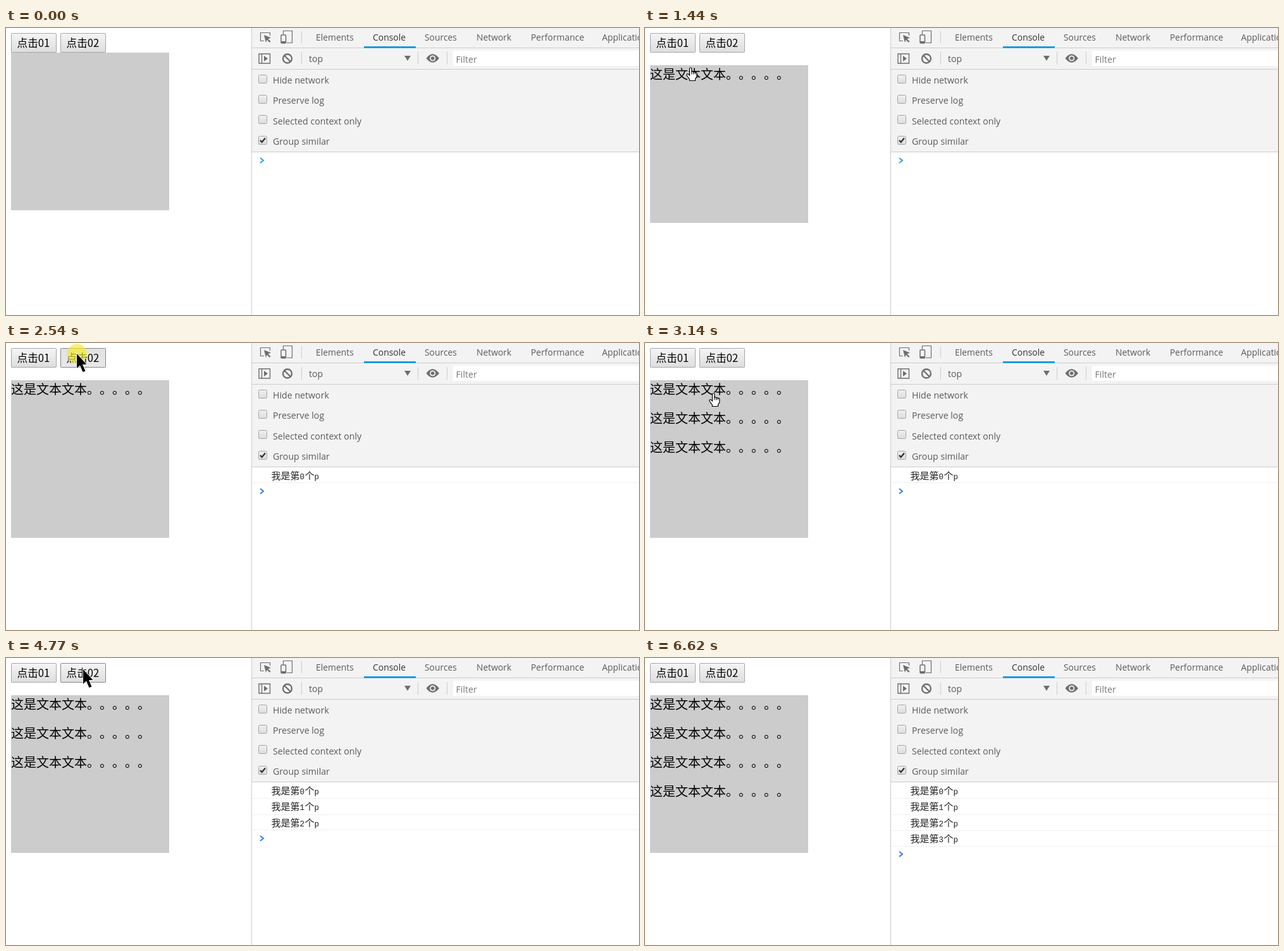
An HTML page with a canvas for the animation above (7080 ms loop, 1001 px wide and 455 px high).

```html
<!DOCTYPE html>
<html lang="zh-CN">
<head>
<meta charset="utf-8">
<title>Click demo</title>
<style>
html, body { margin: 0; width: 100%; height: 100%; overflow: hidden; background: #fff; }
canvas { display: block; }
</style>
</head>
<body>
<canvas id="stage" width="1001" height="455"></canvas>
<script>
const c = document.getElementById('stage').getContext('2d');
const LOOP = 7080, STEP = 76;
const CJK = '"Noto Sans CJK SC", "Noto Sans CJK", sans-serif';
const UI = '"Open Sans", "Noto Sans", sans-serif';
const MONO = '"Liberation Mono", "DejaVu Sans Mono", monospace';
const INK = '#6e6e6e', RULE = '#ccc', PANEL = '#f3f3f3', GLOW = 'rgba(242,236,40,.68)';

// The cursor glides to each stop in turn, moving once per STEP
const entry = { x: 970, y: 518 };
const stops = [
  { from: 140, steps: 10, x: 50, y: 24 },
  { from: 1290, steps: 5, x: 76, y: 70 },
  { from: 2220, steps: 5, x: 112, y: 17 },
  { from: 3070, steps: 5, x: 105, y: 116 },
  { from: 3690, steps: 2, x: 106, y: 141 },
  { from: 3840, steps: 2, x: 99, y: 156 },
  { from: 4370, steps: 6, x: 122, y: 18 },
  { from: 5230, steps: 6, x: 114, y: 225 },
  { from: 5686, steps: 2, x: 110, y: 215 },
  { from: 6240, steps: 5, x: 900, y: 430 }
];
const GONE = 6620;

// Each click takes effect when the button is let go
const click = (adds, up, hold = 80) => ({ adds, up, down: up - hold });
const clicks = [
  click('line', 980), click('log', 1840, 170),
  click('line', 2600), click('line', 2760), click('log', 3540),
  click('log', 4140, 150), click('line', 4920), click('log', 5840)
];
const count = (kind, t) => clicks.filter(k => k.adds === kind && t >= k.up).length;
const easeOut = u => 1 - (1 - u) ** 2;

function cursorAt(t) {
  if (t < stops[0].from || t >= GONE) return null;
  const i = stops.filter(s => t >= s.from).length - 1;
  const a = stops[i - 1] || entry, b = stops[i];
  const k = Math.floor((t - b.from + 12) / STEP) + 1;
  const u = easeOut(Math.min(1, k / b.steps));
  return { x: Math.round(a.x + (b.x - a.x) * u), y: Math.round(a.y + (b.y - a.y) * u) };
}

function box(x, y, w, h, color) {
  c.fillStyle = color;
  c.fillRect(x, y, w, h);
}

function shade(x, y, w, h, top, bottom) {
  const g = c.createLinearGradient(0, y, 0, y + h);
  g.addColorStop(0, top);
  g.addColorStop(1, bottom);
  box(x, y, w, h, g);
}

function text(s, x, y, size, color, family = UI) {
  c.font = size + 'px ' + family;
  c.fillStyle = color;
  c.fillText(s, x, y);
}

function trace(pts) {
  c.beginPath();
  pts.forEach(p => c.lineTo(p[0], p[1]));
}

function stroke(color, width) {
  c.strokeStyle = color;
  c.lineWidth = width;
  c.stroke();
}

function fill(color) {
  c.fillStyle = color;
  c.fill();
}

function line(pts, color, width) {
  trace(pts);
  stroke(color, width);
}

function poly(pts, color) {
  trace(pts);
  c.closePath();
  fill(color);
}

function disc(x, y, r, color) {
  c.beginPath();
  c.arc(x, y, r, 0, Math.PI * 2);
  fill(color);
}

function frame(x, y, w, h, r, color, width = 1) {
  c.beginPath();
  c.roundRect(x, y, w, h, r);
  stroke(color, width);
}

function button(x, label, cur, pressed) {
  const over = cur && cur.x >= x && cur.x < x + 72 && cur.y >= 8 && cur.y < 39;
  if (over && pressed) shade(x, 8, 72, 31, '#e2e2e2', '#e8e8e8');
  else shade(x, 8, 72, 31, '#f5f5f5', '#dddddd');
  frame(x + .5, 8.5, 71, 30, 1, over ? '#868686' : '#a5a5a5');
  text(label, x + 9.5, 30, 16.67, '#000', CJK);
}

function page(t, cur, pressed) {
  const lines = count('line', t);
  button(8, '点击01', cur, pressed);
  button(86, '点击02', cur, pressed);
  box(8, lines ? 59 : 39, 250, 250, '#ccc');
  for (let i = 0; i < lines; i++) {
    // one full-width cell per character keeps the stops apart
    [...'这是文本文本。。。。。'].forEach((ch, n) => text(ch, 8 + 20 * n, 80.5 + 46 * i, 20, '#000', CJK));
  }
}

function inspectIcon() {
  line([[408, 20.5], [402.5, 20.5], [402.5, 7.5], [417.5, 7.5], [417.5, 12]], INK, 1.2);
  poly([[408, 11], [419, 15.5], [414.5, 17.2], [418.5, 21.2], [416.8, 23], [412.8, 18.8], [411, 23]], INK);
}

function deviceIcon() {
  line([[438.5, 10], [438.5, 4.5], [452.5, 4.5], [452.5, 23.5], [444, 23.5]], INK, 1.2);
  frame(435, 11, 7.5, 13, 1, INK, 1.5);
  box(435, 21, 8, 3, INK);
}

function sidebarIcon() {
  frame(400, 41, 17.5, 15, 0, INK, 1.4);
  line([[404.5, 41], [404.5, 56]], INK, 1.4);
  poly([[408, 44], [414, 48.5], [408, 53]], INK);
}

function clearIcon() {
  c.beginPath();
  c.arc(445, 48.5, 7, 0, Math.PI * 2);
  stroke(INK, 2.3);
  line([[440, 43.5], [450, 53.5]], INK, 2.3);
}

function eyeIcon() {
  c.beginPath();
  c.moveTo(664.5, 48);
  c.quadraticCurveTo(674.5, 34.5, 685, 48);
  c.quadraticCurveTo(674.5, 61.5, 664.5, 48);
  fill(INK);
  disc(674.7, 48, 4.6, PANEL);
  disc(674.7, 48, 2.8, INK);
}

function checkbox(i, label, on) {
  const y = Math.round(74.6 + 32.4 * i);
  shade(399, y, 13, 13, '#f0f0f0', '#dcdcdc');
  frame(399.5, y - .5, 13, 13, 2, '#a3a3a3');
  if (on) line([[402, y + 6], [404.7, y + 9], [410, y + 2.5]], '#333', 2.4);
  text(label, 422, Math.round(88 + 32.4 * i), 14.2, '#5a5a5a');
}

function tabs() {
  const left = { Elements: 490, Console: 580, Sources: 662, Network: 744, Performance: 830, Application: 942.5 };
  for (const name in left) text(name, left[name], 20, 13.9, name === 'Console' ? '#333' : '#5a5a5a');
  box(566, 29, 82, 3, '#1a9cdc');
}

function toolbar() {
  box(467, 5, 1, 19, RULE);
  [467, 651, 697].forEach(x => box(x, 38, 1, 20, RULE));
  text('top', 479, 54, 14.2, '#5a5a5a');
  poly([[630, 44], [640, 44], [635, 52]], INK);
  box(707, 36, 294, 24, '#fff');
  text('Filter', 711.5, 55, 14.2, '#777');
  [inspectIcon, deviceIcon, sidebarIcon, clearIcon, eyeIcon].forEach(icon => icon());
}

function logs(n) {
  for (let i = 0; i < n; i++) {
    const y = Math.round(216 + 25.4 * i);
    text('我是第', 419.5, y, 15, '#222', CJK);
    text(i, 464.5, y, 12.5, '#222', MONO);
    text('个', 472.5, y, 15, '#222', CJK);
    text('p', 487.5, y, 12.5, '#222', MONO);
    const rule = Math.round(222.1 + 25.5 * i);
    box(389, i === n - 1 ? rule - 1 : rule, 612, 1, '#f0f0f0');
  }
  const y = Math.round(209.6 + 25.4 * n);
  line([[402, y - 4], [407, y], [402, y + 4]], n ? '#367cf1' : '#3a9cd6', 2);
}

function devtools(t) {
  box(389, 0, 612, 196, PANEL);
  [31, 65, 196].forEach(y => box(389, y, 612, 1, RULE));
  box(388, 0, 1, 455, RULE);
  tabs();
  toolbar();
  ['Hide network', 'Preserve log', 'Selected context only', 'Group similar']
    .forEach((label, i) => checkbox(i, label, i === 3));
  logs(count('log', t));
}

function arrow() {
  trace([[0, 0], [0, 23], [5, 18.5], [9.5, 29], [13.5, 27.5], [9, 17], [15.5, 17]]);
  c.closePath();
  stroke('#fff', 1.8);
  fill('#000');
}

function hand() {
  c.beginPath();
  c.moveTo(-1.5, 1);
  c.quadraticCurveTo(0, -1.5, 1.8, 1);
  c.lineTo(1.8, 6);
  for (let i = 0; i < 3; i++) {
    const x = 1.8 + 2.7 * i, y = 6.4 + .8 * i;
    c.quadraticCurveTo(x + 1.6, y - 1.6, x + 2.7, y + .8);
  }
  [[9.9, 14], [7.5, 18], [7.5, 20.5], [-1.5, 20.5], [-1.5, 18.5], [-6, 12]].forEach(p => c.lineTo(...p));
  c.quadraticCurveTo(-6.5, 9, -3.5, 10);
  c.lineTo(-1.5, 12);
  c.closePath();
  fill('#fff');
  stroke('#000', 1.2);
  for (let i = 0; i < 3; i++) {
    const x = 1.8 + 2.7 * i;
    line([[x, 6 + i * .8], [x, 10.5]], '#000', 1);
  }
}

function cursor(t, cur, press) {
  if (press) disc(cur.x, cur.y, 15.5, GLOW);
  const row = Math.floor((cur.y - 59) / 46);
  const onLine = cur.x >= 8 && cur.x < 258 && row >= 0 &&
    row < count('line', t) && cur.y - 59 - row * 46 < 26;
  c.save();
  c.translate(cur.x, cur.y);
  onLine ? hand() : arrow();
  c.restore();
}

function draw(now) {
  const t = now % LOOP;
  const cur = cursorAt(t);
  const press = clicks.some(k => t >= k.down && t < k.up);
  box(0, 0, 1001, 455, '#fff');
  page(t, cur, press);
  devtools(t);
  if (cur) cursor(t, cur, press);
}

let origin = null;
function tick(now) {
  if (origin === null) origin = now;
  draw(now - origin);
  requestAnimationFrame(tick);
}
draw(0);
requestAnimationFrame(tick);
</script>
</body>
</html>
```
